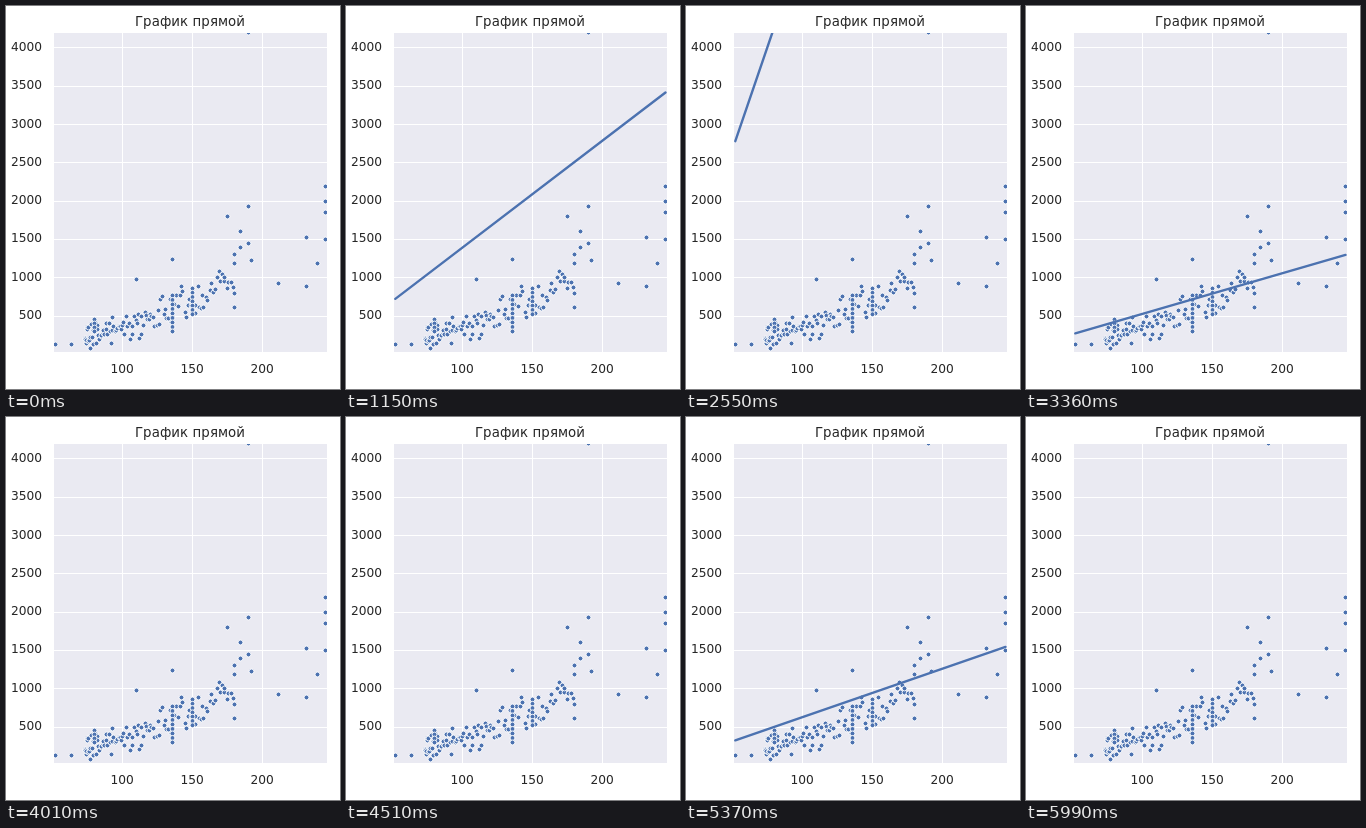
An HTML page that plays this animation: 334x383 px, repeating every 6110 ms.

```html
<!DOCTYPE html>
<html lang="ru">
<head>
<meta charset="utf-8">
<style>
html, body { margin: 0; width: 100%; height: 100%; overflow: hidden; background: #fff; }
svg { display: block; width: 334px; height: 383px; }
text { font-family: "DejaVu Sans", sans-serif; font-size: 12.2px; fill: #262626; }
.title { font-size: 13.33px; letter-spacing: .08px; text-anchor: middle; }
.grid { stroke: #fff; stroke-width: 1; }
.dots { fill: #4c72b0; stroke: #fff; stroke-width: .9; }
#fit { stroke: #4c72b0; stroke-width: 2.4; stroke-linecap: round; }
</style>
</head>
<body>
<svg viewBox="0 0 334 383">
  <clipPath id="area"><rect x="48" y="27" width="273" height="319"/></clipPath>
  <rect x="48" y="27" width="273" height="319" fill="#eaeaf2"/>
  <text class="title" x="184" y="20">График прямой</text>
  <g id="labels"></g>
  <g clip-path="url(#area)">
    <g class="grid" id="grid"></g>
    <g class="dots" id="dots"></g>
    <line id="fit"/>
  </g>
</svg>
<script>
const LOOP = 6110, SHOWN = 210;
const X_MIN = 52, X_MAX = 245;
const toX = v => 1.4 * v - 23.5;
const toY = v => 348.45 - 0.07665 * v;
const snap = v => Math.floor(v) + 0.5;

// start (ms) and slope of each line through the origin
const flashes = [
  [590, 33.3], [1150, 13.95], [1780, 8.95], [2160, 20], [2550, 53.5],
  [3000, 9.13], [3360, 5.3], [3790, 1.37], [4160, 0.86], [4560, 3],
  [4960, 10.9], [5370, 6.31], [5780, 0.86]
];

// dots standing clear of the main cloud
const outliers = [
  [242, 26], [242, 200], [221, 210], [234, 225], [234, 241], [242, 237],
  [228, 248], [245, 254], [319, 180], [319, 195], [319, 206], [319, 233],
  [300, 231], [311, 257], [272, 277], [300, 280], [228, 287], [228, 301],
  [166, 253], [130, 273], [49, 338], [65, 338]
];

const byId = id => document.getElementById(id);

function setAttrs(node, attrs) {
  for (const name in attrs) node.setAttribute(name, attrs[name]);
}

function add(parent, tag, attrs, text = "") {
  const node = document.createElementNS(parent.namespaceURI, tag);
  setAttrs(node, attrs);
  node.textContent = text;
  parent.append(node);
}

function dot(x, y) {
  add(byId("dots"), "circle", { cx: x + 0.5, cy: y + 0.5, r: 2.45 });
}

function stack(x, top, bottom, gap) {
  for (let y = top; y <= bottom; y += gap) dot(x, y);
}

let seed = 7;
function random() {
  seed = (seed * 16807) % 2147483647;
  return seed / 2147483647;
}

// cloud that thins out and climbs towards the right
function cloud(count) {
  for (let i = 0; i < count; i++) {
    const across = ((i + random()) / count) ** 1.4;
    const middle = 328 - 56 * across ** 1.4;
    const spread = 18 * (random() + random() - 1);
    dot(Math.round(79 + 150 * across), Math.round(middle + spread));
  }
}

for (let v = 500; v <= 4000; v += 500) {
  const y = snap(toY(v));
  add(byId("grid"), "line", { x1: 48, x2: 321, y1: y, y2: y });
  add(byId("labels"), "text",
    { x: 36, y: Math.floor(toY(v) + 3.51), "text-anchor": "end" }, v);
}
for (let v = 100; v <= 200; v += 50) {
  const x = snap(toX(v));
  add(byId("grid"), "line", { x1: x, x2: x, y1: 27, y2: 346 });
  add(byId("labels"), "text", { x: x - 0.4, y: 367, "text-anchor": "middle" }, v);
}

cloud(115);
stack(88, 313, 325, 4);
stack(166, 289, 326, 4.5);
stack(186, 282, 308, 4.3);
outliers.forEach(([x, y]) => dot(x, y));

const fit = byId("fit");
const start = performance.now();

function draw() {
  const t = Math.max(0, performance.now() - start) % LOOP;
  const active = flashes.find(([on]) => t >= on && t < on + SHOWN);
  fit.style.visibility = active ? "visible" : "hidden";
  if (active) {
    const slope = active[1];
    setAttrs(fit, {
      x1: toX(X_MIN), y1: toY(slope * X_MIN),
      x2: toX(X_MAX), y2: toY(slope * X_MAX)
    });
  }
  requestAnimationFrame(draw);
}
draw();
</script>
</body>
</html>
```
